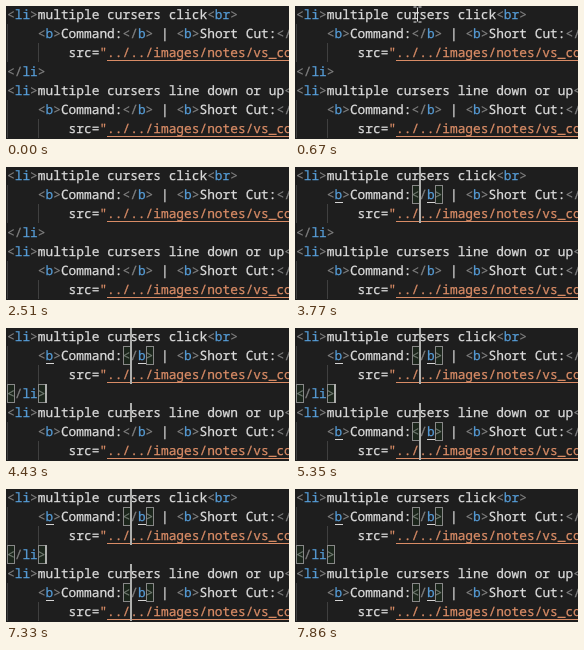
Write an HTML page that moves like this. It is 283 by 133 pixels and loops after 7.99 s.

```html
<!DOCTYPE html>
<html lang="en">
<head>
<meta charset="utf-8">
<title>Multiple cursors</title>
<style>
html, body { margin: 0; height: 100%; overflow: hidden; background: #1e1e1e; }
svg { display: block; width: 283px; height: 133px; }
text {
  font: 12.83px "Noto Sans Mono", "DejaVu Sans Mono", monospace;
  text-rendering: geometricPrecision;
  white-space: pre;
}
tspan { fill: currentColor; stroke: currentColor; stroke-width: .25px; color: #dcdcdc; }
tspan.mark { color: #808080; }
tspan.tag { color: #569cd6; }
tspan.str { color: #d98c66; }
.link { fill: #d98c66; }
.guide { fill: #404040; }
.box { fill: rgba(0, 100, 0, .1); stroke: #888; }
.under { fill: #d4d4d4; }
.caret { fill: #aeafad; }
#mouse { fill: none; stroke: #e4e4e4; }
</style>
</head>
<body>
<svg viewBox="0 0 283 133">
  <g id="code"></g>
  <g id="carets"></g>
  <path id="mouse" d="M-4 -7.5H-1M1 -7.5H4M0 -7V7M-4 7.5H-1M1 7.5H4"/>
</svg>
<script>
const LOOP = 7990, LEFT = 1, CHAR = 7.7, ROW = 19;
const code = document.getElementById('code');
const caretLayer = document.getElementById('carets');
const mouse = document.getElementById('mouse');
const colX = col => LEFT + col * CHAR;
const rowY = row => row * ROW - 1;

function add(parent, name, attrs, text) {
  const el = document.createElementNS('http://www.w3.org/2000/svg', name);
  for (const key in attrs) el.setAttribute(key, attrs[key]);
  if (text) el.textContent = text;
  return parent.appendChild(el);
}

const rect = (parent, cls, x, y, width, height) =>
  add(parent, 'rect', { class: cls, x, y, width, height });

const labels = '<b>Command:</b> | <b>Short Cut:</b>';
const link = 'src="../../images/notes/vs_code';
const lines = [
  [0, '<li>multiple cursers click<br>'], [4, labels], [8, link], [0, '</li>'],
  [0, '<li>multiple cursers line down or up<br>'], [4, labels], [8, link]
];

// Indent guides, then text coloured by token
lines.forEach(([indent, source], row) => {
  for (let col = 0; col < indent; col += 4)
    rect(code, 'guide', Math.round(colX(col)), rowY(row), 1, ROW);
  const y = rowY(row) + 14;
  const line = add(code, 'text', { x: colX(indent), y });
  for (const part of source.match(/<\/?|>|=|"[^"]*|[^<>="]+/g)) {
    const before = line.textContent;
    const cls = /^[<>]/.test(part) ? 'mark'
      : /<\/?$/.test(before) ? 'tag'
      : part[0] === '"' ? 'str' : '';
    add(line, 'tspan', { class: cls }, part);
  }
  if (source === link) rect(code, 'link', 101, y + 3, 182, 1);
});

// When each row gets its caret, and its highlighted brackets
const starts = [1000, 3500, 3770, 4170, 4430, 4890, 5350];
const brackets = { 1: [117, 140], 3: [1, 32], 5: [117, 140] };
const rows = starts.map((start, row) => {
  const y = rowY(row);
  const marks = add(code, 'g', {});
  for (const x of brackets[row] || []) rect(marks, 'box', x + .5, y + .5, 7, 18);
  if (row === 1 || row === 5)
    for (const x of [40, 132]) rect(marks, 'under', x, y + 17, 8, 1);
  const caret = rect(caretLayer, 'caret', row === 3 ? 39 : 124, y, 2, ROW);
  return { start, marks, caret };
});

// Moments at which every caret switches on or off together
const blinks = [1540, 2050, 2510, 3040, 5880, 6340, 6870, 7330, 7860];

// time, x, y of the pointer; no position means it is off stage
const path = [
  [0], [130, 212, 106], [200, 150, 50], [270, 91, 8.5],
  [530, 101, 8.5], [600, 113, 8.5], [670, 122, 8.5], [740, 126, 8.5],
  [1200, 5, 56], [1270]
];

const show = (el, on) => el.setAttribute('visibility', on ? 'visible' : 'hidden');

function draw(now) {
  const t = now % LOOP;
  const lit = blinks.filter(b => b <= t).length % 2 === 0;
  for (const { start, marks, caret } of rows) {
    show(marks, t >= start);
    show(caret, t >= start && lit);
  }
  const [, x, y] = path.filter(p => p[0] <= t).pop();
  show(mouse, x !== undefined);
  if (x !== undefined) mouse.setAttribute('transform', `translate(${x + .5} ${y})`);
}

const origin = performance.now();
function tick() {
  draw(performance.now() - origin);
  requestAnimationFrame(tick);
}
tick();
</script>
</body>
</html>
```
